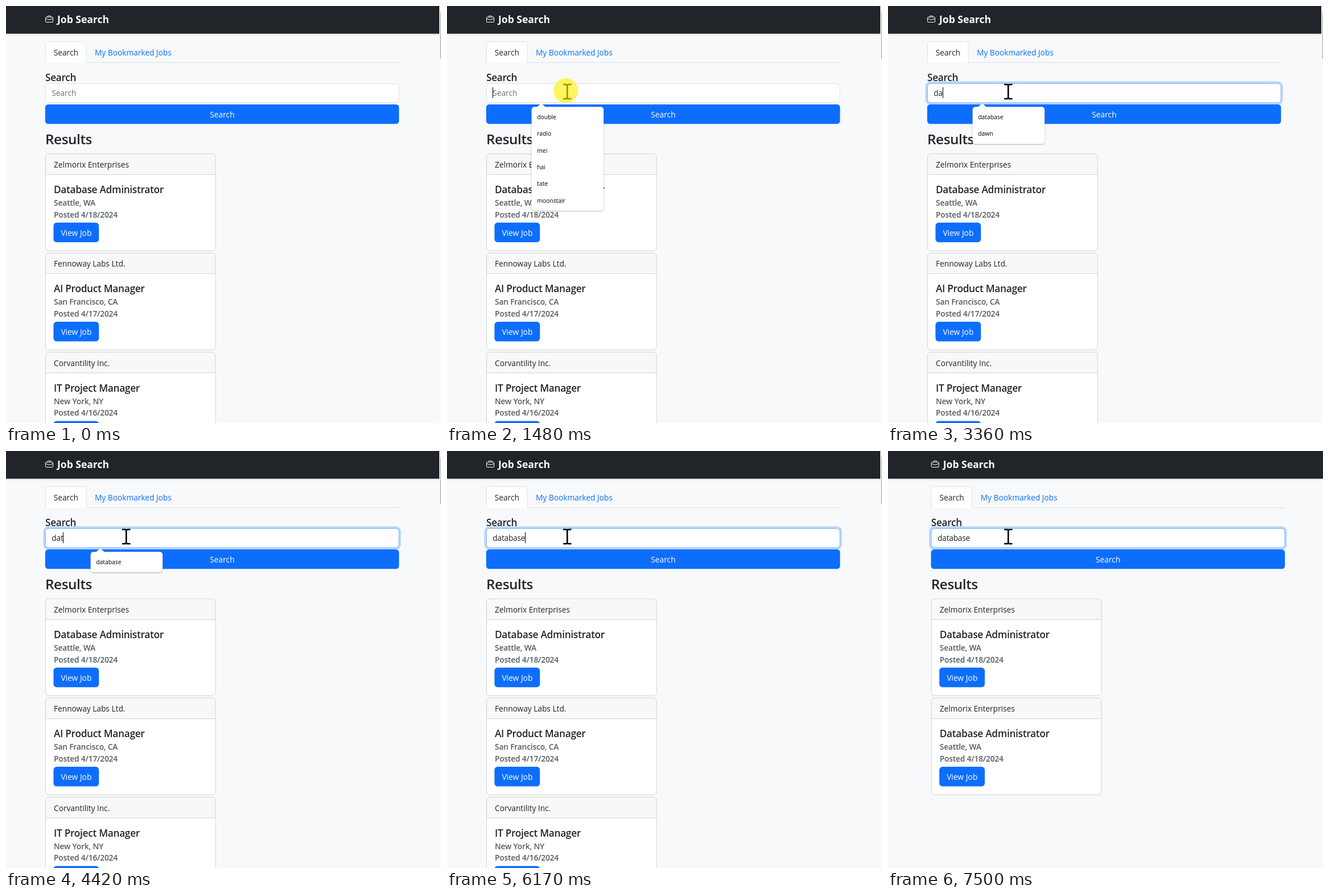
These frames come from a looping animation (764x733 px, 8 s). An HTML page:

```html
<!DOCTYPE html>
<html lang="en">
<head>
<meta charset="utf-8">
<title>Job Search</title>
<style>
html, body { margin: 0; width: 100%; height: 100%; overflow: hidden; background: #f8f9fb; }
svg { display: block; }
text { font: 13.7px "Open Sans", "Noto Sans", sans-serif; fill: #212529; white-space: pre; }
.h { font-size: 17.2px; font-weight: 600; letter-spacing: -.015em; }
.h3 { font-size: 24.2px; font-weight: 600; letter-spacing: -.015em; }
.brand { font-size: 17.5px; font-weight: 700; fill: #fff; }
.sub { font-weight: 600; letter-spacing: -.01em; fill: #56595c; }
.link { fill: #0d6efd; }
.btn { font-size: 13.8px; fill: #fff; text-anchor: middle; }
.hint { fill: #6c7075; }
.typed { letter-spacing: -.015em; }
.item { font-size: 10.3px; font-weight: 500; fill: #000; }
</style>
</head>
<body>
<svg id="stage" width="764" height="733" viewBox="0 0 764 733"></svg>
<script>
const BLUE = '#0d6efd', LINE = '#dee2e6', SHIFT = 6.75;
const $ = id => document.getElementById(id);
const text = (x, y, s, cls = '') => `<text x="${x}" y="${y}" class="${cls}">${s}</text>`;
const box = (x, y, w, h, fill, more = '') =>
  `<rect x="${x}" y="${y}" width="${w}" height="${h}" fill="${fill}" ${more}/>`;
const path = (d, more) => `<path d="${d}" ${more}/>`;
const shadow = (id, dy, blur, opacity) =>
  `<filter id="${id}" x="-10%" y="-10%" width="120%" height="140%" color-interpolation-filters="sRGB">` +
  `<feDropShadow dx="0" dy="${dy}" stdDeviation="${blur}" flood-opacity="${opacity}"/></filter>`;

const card = (i, company, title, place, date) => `<g transform="translate(0 ${i * 174.3})">` +
  box(69.5, 259.9, 298.6, 170, '#fff', 'rx="5.4"') +
  path('M69.5 296.5V265.3a5.4 5.4 0 0 1 5.4 -5.4H362.7a5.4 5.4 0 0 1 5.4 5.4V296.5z', 'fill="#f7f8f8"') +
  path('M69.5 296.3H368', 'stroke="#d2d3d4"') +
  box(69.5, 259.9, 298.6, 170, 'none', 'stroke="#d2d3d4" rx="5.4"') +
  text(84, 284, company) + text(84, 329, title, 'h') +
  text(84, 351, place, 'sub') + text(84, 371.5, 'Posted ' + date, 'sub') +
  box(83.4, 380.8, 79.8, 34.4, BLUE, 'rx="5.4"') + text(123.4, 404, 'View Job', 'btn') + '</g>';

const admin = i => card(i, 'Zelmorix Enterprises', 'Database Administrator', 'Seattle, WA', '4/18/2024');
const allJobs = admin(0) +
  card(1, 'Fennoway Labs Ltd.', 'AI Product Manager', 'San Francisco, CA', '4/17/2024') +
  card(2, 'Corvantility Inc.', 'IT Project Manager', 'New York, NY', '4/16/2024');
const foundJobs = admin(0) + admin(1);

const popup = items => {
  const h = 36 + 29.3 * (items.length - 1);
  return '<g filter="url(#soft)">' + box(148.5, 177.3, 126.6, h, '#fff', 'rx="5"') +
    path('M157.5 178L165.5 171L173.5 178z', 'fill="#fff"') + '</g>' +
    items.map((s, i) => text(158.3, 199 + 29.3 * i, s, 'item')).join('');
};

$('stage').innerHTML = '<defs>' + shadow('soft', 1, 1.3, .3) + shadow('faint', 1.8, 1.8, .075) + '</defs>' +
  box(0, 0, 764, 733, '#f8f9fb') +
  box(0, 0, 764, 48.7, '#212529', 'filter="url(#faint)"') +
  '<g id="bar">' + box(761, 0, 3, 733, '#fafafa') + box(762.6, 11, 1.4, 82, '#b4b4b4') + '</g><g id="page">' +
  path('M70.8 19.5H81.2a1.3 1.3 0 0 1 1.3 1.3V27.2a1.3 1.3 0 0 1 -1.3 1.3H70.8a1.3 1.3 0 0 1 -1.3 -1.3V20.8a1.3 1.3 0 0 1 1.3 -1.3z' +
    'M73 19.5V18.4a1 1 0 0 1 1 -1H78a1 1 0 0 1 1 1V19.5M69.5 22.3L76 24.2L82.5 22.3', 'fill="none" stroke="#fff"') +
  text(90, 30, 'Job Search', 'brand') +
  path('M69.5 99.5V68a5.4 5.4 0 0 1 5.4 -5.4H135.6a5.4 5.4 0 0 1 5.4 5.4V99.5', `fill="#fff" stroke="${LINE}"`) +
  path('M141 99.5H690', `stroke="${LINE}"`) +
  text(83.8, 87, 'Search') + text(156, 87, 'My Bookmarked Jobs', 'link') +
  text(69, 132, 'Search', 'h') +
  box(67.3, 134.3, 624.4, 37.4, 'none', `id="ring" rx="7" stroke="${BLUE}" stroke-opacity=".27" stroke-width="3.6"`) +
  box(69.5, 136.4, 620.5, 33.4, '#fff', `id="field" rx="5.4" stroke="${LINE}"`) +
  '<text id="input" x="80.3" y="158"></text>' + box(80, 143, 1, 19, '#000', 'id="caret"') +
  box(68.8, 172.9, 621.5, 34.4, BLUE, 'id="go" rx="5.4"') + text(379.7, 196, 'Search', 'btn') +
  text(69, 243, 'Results', 'h3') + '<g id="jobs"></g><g id="list"></g></g>' +
  '<g id="arrow">' + path('M.7 1V25.5L6.4 20.2L10.4 29.6L14.4 27.9L10.5 18.8H18.6z', 'fill="#fff" stroke="#000" stroke-width="1.3"') + '</g>' +
  path('M204 138H208.5Q211 138 211.2 140Q211.5 138 214 138H218.5M204 163H208.5Q211 163 211.2 161Q211.5 163 214 163H218.5M211.2 139V162',
    'id="beam" fill="none" stroke="#000" stroke-width="2.6"') +
  '<circle id="click" cx="208.7" cy="148.7" r="21.6" fill="#ffee00" fill-opacity=".62"/>';

const show = (id, on) => $(id).setAttribute('visibility', on ? 'visible' : 'hidden');
const set = (id, name, value) => $(id).setAttribute(name, value);
const fill = (id, html) => { if ($(id).shown !== html) $(id).innerHTML = $(id).shown = html; };
const clamp = v => Math.max(0, Math.min(1, v));

const keyTimes = [3290, 3360, 4420, 4550, 5560, 5670, 5740, 5890];
const blinks = [1480, 2020, 2550, 3080, 3290, 3890, 4420, 5080, 5560, 6440, 6970, 7500];
const past = ['double', 'radio', 'mei', 'hai', 'tate', 'moonstair'];

function pointer(t) {
  if (t < 240) return [727, 719];
  if (t < 310) return [725, 713];
  const p = t < 510 ? 0 : clamp((Math.floor((t - 510) / 70) + 1) / 11);
  const e = p * p * (3 - 2 * p);
  return [704 - 493 * e, 652 - 502 * e];
}

function options(t, n) {
  if (t < 1480 || t >= 6170) return [];
  return n === 0 ? past : n < 3 ? ['database', 'dawn'] : ['database'];
}

function draw(t) {
  const n = keyTimes.filter(k => t >= k).length;
  const done = t >= 6370;
  set('page', 'transform', `translate(${done ? SHIFT : 0} 0)`);
  show('bar', !done);
  fill('jobs', done ? foundJobs : allJobs);

  set('input', 'class', n ? 'typed' : 'hint');
  fill('input', n ? 'database'.slice(0, n) : 'Search');
  set('caret', 'x', n ? Math.round(80 + $('input').getComputedTextLength()) : 80);
  show('caret', blinks.filter(b => t >= b).length % 2);

  const focus = clamp(Math.floor((t - 1480) / 70) / 2);
  set('ring', 'opacity', focus);
  set('field', 'stroke', focus ? '#86b7fe' : LINE);

  const items = options(t, n);
  fill('list', items.length ? popup(items) : '');
  set('list', 'opacity', 1 - clamp(Math.floor((t - 5890) / 70) / 4));

  const [x, y] = pointer(t);
  const typing = y < 171;
  show('arrow', t >= 70 && !typing);
  set('arrow', 'transform', `translate(${x} ${y})`);
  show('beam', typing);
  show('click', t >= 1480 && t < 1550);
  set('go', 'fill', y > 173 && y < 207 ? '#0b5ed7' : BLUE);
}

const start = performance.now();
function tick() {
  draw((performance.now() - start) % 8000);
  requestAnimationFrame(tick);
}
tick();
</script>
</body>
</html>
```
